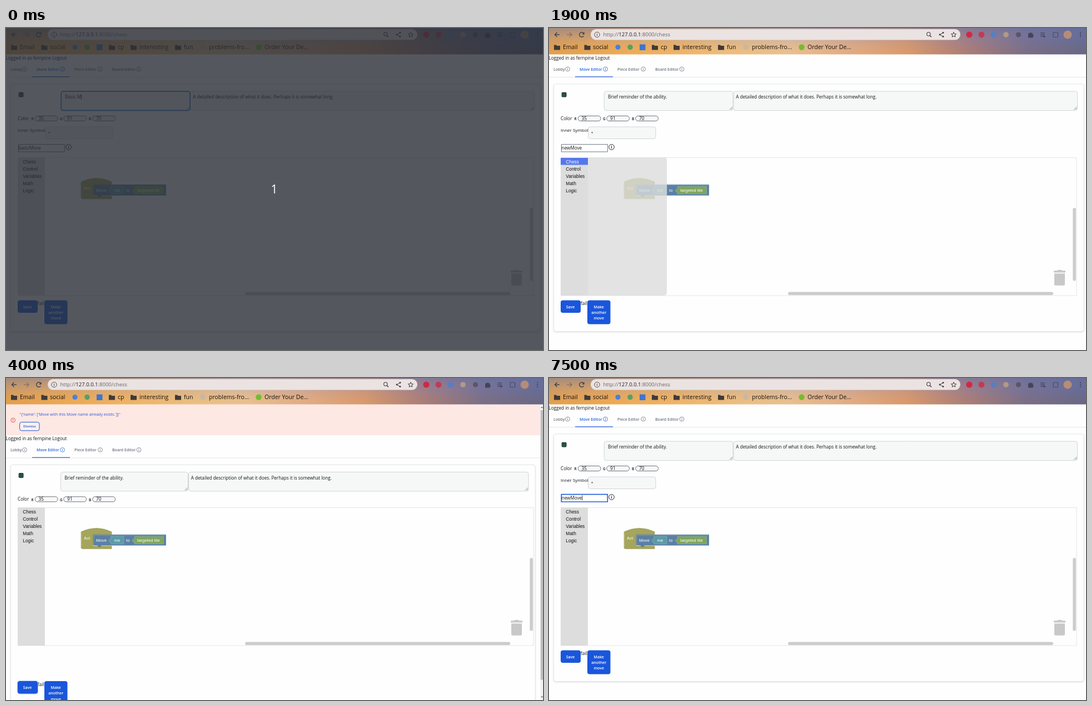
Animation, 966 px wide and 580 px high, one loop 8000 ms. Source, as an HTML page with a canvas:

```html
<!DOCTYPE html>
<html lang="en">
<head>
<meta charset="utf-8">
<title>Move editor</title>
<style>
html, body { margin: 0; width: 100%; height: 100%; overflow: hidden; background: #fefefe; }
canvas { display: block; width: 966px; height: 580px; }
</style>
</head>
<body>
<canvas id="stage" width="966" height="580"></canvas>
<script>
const ctx = document.getElementById('stage').getContext('2d');
const LOOP = 8000;
const UI = '"Open Sans", "Noto Sans", sans-serif';
const ARIAL = '"Liberation Sans", Arial, sans-serif';
const INK = '#141414', BLUE = '#1a56db', DARK_BLUE = '#1e429f', RING = '#a4cafe', LINE = '#d1d5d8';
let t = 0;

const during = (from, to) => t >= from && t < to;

// y is the middle of the capital letters
function text(s, x, y, size = 8.15, color = INK, { weight = 400, font = UI, align = 'left' } = {}) {
  ctx.font = `${weight} ${size}px ${font}`;
  ctx.textAlign = align;
  ctx.fillStyle = color;
  ctx.fillText(s, x, y + size * 0.36);
  return ctx.measureText(s).width;
}

function box(x, y, x2, y2, r, fill, stroke, width = 1) {
  ctx.beginPath();
  ctx.roundRect(x, y, x2 - x, y2 - y, r);
  paint(fill, stroke, width);
}

function paint(fill, stroke, width = 1) {
  if (fill) { ctx.fillStyle = fill; ctx.fill(); }
  if (stroke) { ctx.strokeStyle = stroke; ctx.lineWidth = width; ctx.stroke(); }
}

function disc(x, y, r, fill, stroke, width = 1) {
  ctx.beginPath();
  ctx.arc(x, y, r, 0, Math.PI * 2);
  paint(fill, stroke, width);
}

function line(color, width, ...points) {
  ctx.beginPath();
  for (let i = 0; i < points.length; i += 2) ctx.lineTo(points[i], points[i + 1]);
  paint(null, color, width);
}

function shape(d, fill, stroke, width = 1) {
  const path = new Path2D(d);
  if (fill) { ctx.fillStyle = fill; ctx.fill(path); }
  if (stroke) { ctx.strokeStyle = stroke; ctx.lineWidth = width; ctx.stroke(path); }
}

function gradient(x, y, x2, y2, stops) {
  const g = ctx.createLinearGradient(x, y, x2, y2);
  stops.forEach((c, i) => g.addColorStop(i / (stops.length - 1), c));
  return g;
}

function info(x, y, r, color) {
  disc(x, y, r, null, color, r / 5);
  ctx.fillStyle = color;
  const w = r / 4.5;
  ctx.fillRect(x - w / 2, y - r * 0.15, w, r * 0.65);
  ctx.fillRect(x - w / 2, y - r * 0.5, w, w);
}

function folder(x) {
  shape(`M${x} 30.5h4l1.2 1.5h5.8v7.5h-11z`, '#3f3a3a');
}

function sky() {
  ctx.fillStyle = gradient(0, 0, 966, 0, ['#e3a04c', '#efab55', '#f2b666', '#efc384', '#ecc69a', '#e3b08c', '#d99a70', '#a2797f', '#6a6890', '#56608f']);
  ctx.fillRect(0, 0, 966, 47.5);
  ctx.fillStyle = gradient(0, 0, 0, 47, ['rgba(110,120,165,.55)', 'rgba(150,140,165,.25)', 'rgba(230,150,60,.12)']);
  ctx.fillRect(0, 0, 966, 47.5);
}

function toolbar() {
  const ink = '#3b3b42';
  line(ink, 1.3, 14.5, 8, 10.5, 12, 14.5, 16);
  line(ink, 1.3, 10.5, 12, 19, 12);
  line('rgba(70,65,75,.45)', 1.3, 37, 8, 41, 12, 37, 16);
  line('rgba(70,65,75,.45)', 1.3, 32, 12, 41, 12);
  ctx.beginPath();
  ctx.arc(59, 12, 4.2, 0.6, 5.5);
  paint(null, ink, 1.4);
  shape('M63.6 7.2v4.2h-4.2z', ink);

  box(75, 2, 740, 21.5, 10, '#ebe3e2');
  info(86.5, 12, 4.7, '#4a4a50');
  let x = 97.5;
  x += text('http://', x, 12, 9.5, '#66646a');
  x += text('127.0.0.1', x, 12, 9.5, '#1e1e22');
  text(':8000/chess', x, 12, 9.5, '#66646a');

  disc(682.8, 11, 3.2, null, ink, 1.1);
  line(ink, 1.3, 685, 13.5, 688, 16.3);
  line(ink, 1, 709, 8.5, 703, 12, 709, 15.5);
  for (const [a, b] of [[709, 8.5], [703, 12], [709, 15.5]]) disc(a, b, 1.4, ink);
  ctx.beginPath();
  for (let i = 0; i < 10; i++) {
    const a = -Math.PI / 2 + i * Math.PI / 5, r = i % 2 ? 2.1 : 4.8;
    ctx.lineTo(728 + r * Math.cos(a), 12.3 + r * Math.sin(a));
  }
  ctx.closePath();
  paint(null, ink, 1);

  disc(756, 12, 5.6, '#cf2945');
  disc(778, 12, 5.4, '#c23a54');
  disc(800, 12, 5.3, '#587fc0');
  disc(822, 12, 4.8, '#b19a86');
  disc(844.5, 12, 4.6, '#5b5568');
  shape('M862 9.5h3a1.6 1.6 0 1 1 3.2 0h2.300v3a1.500 1.500 0 1 1 0 3v2h-8.500z', '#46435a');
  for (const y of [9, 12, 15]) line('#45435c', 1.2, 884, y, y > 14 ? 889 : 892, y);
  shape('M889.5 13l4.500 2.300-4.500 2.300z', '#45435c');
  box(907, 8, 915.5, 16.5, 1, null, '#4c4a63', 1.2);
  disc(933, 12, 7.5, '#b48d78');
  for (const y of [8.5, 12, 15.5]) disc(956, y, 1, '#3a3d5c');
}

function bookmarks() {
  [9, 63.5, 185, 224, 304].forEach(folder);
  disc(124, 34.5, 4.6, '#4a80dc');
  disc(146, 34.5, 4.8, '#57a066');
  box(163, 29.5, 173.5, 40, 0, '#3d75d0');
  disc(354, 34.5, 5, '#c8b7a4');
  disc(454.5, 34.5, 5.2, '#72bd2f');
  const labels = [['Email', 25], ['social', 79], ['cp', 201], ['interesting', 240], ['fun', 320], ['problems-fro…', 365], ['Order Your De…', 465]];
  for (const [s, x] of labels) text(s, x, 34.5, 10.5, '#17130f');
}

function tabs() {
  text('Logged in as fernpine Logout', -0.5, 54);
  ctx.fillStyle = '#e4e6e9';
  ctx.fillRect(0, 88, 966, 1);
  const hover = during(5800, 5900);
  const tab = (s, x, icon, color) => {
    text(s, x, 74, 7, color, { weight: 600 });
    info(icon, 74, 3.9, color);
  };
  const grey = '#6b7280';
  tab('Lobby', 8, 33.5, grey);
  tab('Move Editor', 55, 101.5, '#2563d9');
  tab('Piece Editor', 123, 169.5, hover ? '#3f4754' : grey);
  tab('Board Editor', 191, 239, grey);
  if (hover) { ctx.fillStyle = LINE; ctx.fillRect(115, 87, 68, 1.3); }
  ctx.fillStyle = '#2f68dc';
  ctx.fillRect(47, 87.2, 68, 1.3);
}

function field(x, x2, s, pad, focused, caret) {
  box(x + 0.5, 114, x2 - 0.5, 148.5, 4, '#f6f8f7', focused ? '#3b7ae0' : LINE, focused ? 1.6 : 1);
  const w = text(s, x + pad, 124.5);
  if (caret) line('#111', 0.8, x + pad + w + 0.6, 120, x + pad + w + 0.6, 129);
  line('#666', 0.7, x2 - 6.5, 147, x2 - 1.5, 142);
  line('#666', 0.7, x2 - 3.8, 147, x2 - 1.5, 144.7);
}

function number(label, x, value) {
  text(label, x - 6.5, 163.8, 6.4, INK, { weight: 600 });
  box(x + 0.3, 158.4, x + 41, 167.5, 4.2, '#f7f8f8', '#5d636b', 0.9);
  text(value, x + 6.5, 163, 8.3);
}

function moveName() {
  if (t < 200) return 'Basic M';
  if (t < 300) return 'Basic Mov';
  return t < 1800 ? 'Basic Move' : 'Brief reminder of the ability.';
}

function form(error) {
  const right = error ? 952 : 962;
  ctx.save();
  ctx.shadowColor = 'rgba(0,0,0,.16)';
  ctx.shadowBlur = 3;
  ctx.shadowOffsetY = 1;
  box(8.5, 101, right, 546.5, 4, '#fefefe');
  ctx.restore();
  box(8.5, 101, right, 546.5, 4, null, '#e3e5e8', 0.9);

  box(23.2, 116.2, 31, 124, 1, '#235b46', '#1d2723', 1);
  text('+', 25, 119.5, 4.5, '#07130e');

  const split = error ? 328 : 331.5;
  const describe = during(600, 1700);
  field(error ? 98 : 98.7, split, moveName(), 7.3, t < 600, t < 600);
  field(split, error ? 940.5 : 951, 'A detailed description of what it does. Perhaps it is somewhat long.', 4.7, describe, during(600, 1200));
  if (t < 600) box(99.2, 114, 331, 148.5, 4, null, '#3b7ae0', 1.6);

  text('Color', 21, 163);
  number('R', 52, '35');
  number('G', 103.5, '91');
  number('B', 155.5, '70');
  if (during(5600, 5700)) {
    shape('M184 162l2.200-2.600 2.200 2.600zM184 164l2.200 2.600 2.200-2.600z', '#333');
  }

  text('Inner Symbol', 21, 183.7, 8);
  box(70.5, 178, 192, 199.5, 4, '#f6f8f7', LINE);
  text('+', 75.8, 188.5, 7);

  const editing = t >= 7500;
  box(22.3, 209.7, 105.3, 223, 0, '#fff', editing ? '#2563d9' : '#5f6670', editing ? 1.7 : 0.9);
  const w = text(t < 1800 ? 'basicMove' : 'newMove', 22.7, 216);
  if (editing) line('#111', 0.8, 23.4 + w, 211.5, 23.4 + w, 220.5);
  info(112.5, 214.5, 4.8, '#171717');
}

function buttons(error) {
  const saving = during(3800, 4000);
  const x = saving ? 87 : 69;
  const white = { weight: 600, align: 'center' };
  text(saving ? 'saving...' : 'fail', 57, 496.5, 8.15);
  if (during(3800, 6300)) box(20, 489.5, 58, 514, 5, RING);
  box(21, 490.5, 57, 513, 4, during(3200, 4000) ? DARK_BLUE : BLUE);
  text('Save', 38.5, 502, 7, '#fff', white);
  box(x, 490.5, x + 41.5, 533.5, 4, BLUE);
  ['Make', 'another', 'move'].forEach((s, i) => text(s, x + 20.7, 502 + i * 10.4, 7, '#fff', white));
}

function blocks() {
  const olive = '#a5a55b', blue = '#5b80a5', teal = '#5b9ba5', green = '#80a55b';
  const label = (s, x, y) => text(s, x, y, 7.8, '#fff', { font: ARIAL });
  shape('M135 277Q162.500 264 190 277V282H157V302.700H190V307.700H138Q135 307.700 135 304.700Z', olive, '#92924f', 0.6);
  line('#c4c48f', 0.7, 135.6, 304, 135.6, 277.3);
  shape('M157 282.300H287.500V301.300H172l-2.300 2.700h-3l-2.300-2.700H159.500Q157 301.300 157 299Z', blue, '#4b6f94', 0.6);
  line('#8ca6c0', 0.7, 157.7, 299, 157.7, 283, 287, 283);
  const value = (x, x2, color) => {
    shape(`M${x} 285.300H${x2}V299H${x}V295.500C${x - 4.5} 297 ${x - 4.5} 288.500 ${x} 290.500Z`, color, '#8fb3b5', 0.6);
  };
  value(188.5, 212, teal);
  value(231, 283.5, green);
  label('Act', 140, 288.3);
  label('Move', 162, 292);
  label('me', 194.5, 292.3);
  label('to', 216, 292);
  label('targeted tile', 236, 292.3);
}

function workspace() {
  box(21.5, 233.5, 949, 482, 0, '#fefefe', '#e2e2e2', 0.9);
  blocks();
  box(430, 475.5, 907, 481, 2.8, '#ccc');
  box(942.3, 324, 947.8, 455.5, 2.8, '#ccc');
  shape('M908 440.500v-2.500q0-1 1-1h5.500v-1.200h8v1.200h5.500q1 0 1 1v2.500zM909 442.300h19v19.500q0 2-2 2h-15q-2 0-2-2z', '#c8c8c8');

  const open = during(1700, 2600);
  if (open) box(70, 233, 212, 482, [0, 5, 5, 0], 'rgba(221,221,221,.8)');
  ctx.fillStyle = '#ddd';
  ctx.fillRect(21, 233, 49, 249);
  if (open || during(1600, 1700)) {
    ctx.fillStyle = open ? '#5577ee' : '#e6e6e6';
    ctx.fillRect(21, 234, 49, 12.5);
  }
  ['Chess', 'Control', 'Variables', 'Math', 'Logic'].forEach((s, i) =>
    text(s, 30.3, 240.6 + i * 13.05, 8.3, open && !i ? '#fff' : '#111', { font: ARIAL }));
}

function banner() {
  ctx.fillStyle = '#fde8e4';
  ctx.fillRect(0, 47.5, 961, 55.7);
  text('"{\'name\': [\'Move with this Move name already exists.\']}"', 24.3, 65.3, 7.1, '#2f58dc');
  disc(12.7, 76, 3.8, null, '#dc4a3e', 0.9);
  line('#dc4a3e', 0.9, 12.7, 73.8, 12.7, 76.6);
  line('#dc4a3e', 0.9, 12.7, 77.4, 12.7, 78.3);
  const hover = t >= 6100;
  if (t >= 6300) box(21, 77.5, 63, 97.5, 5, RING);
  box(24.6, 79.6, 60, 94.8, 3.5, hover ? DARK_BLUE : '#fdf0ed', BLUE, 1);
  text('Dismiss', 42.3, 87.3, 6.1, hover ? '#fff' : BLUE, { weight: 600, align: 'center' });
}

function scrollbar() {
  ctx.fillStyle = '#f3f3f3';
  ctx.fillRect(961, 47.5, 5, 533);
  ctx.fillStyle = '#bdbdbd';
  ctx.fillRect(961.7, 58, 4.3, 485.5);
  shape('M962 54l2-2.500 2 2.500zM962 573.500l2 2.500 2-2.500z', '#666');
}

function draw() {
  const error = during(4000, 6500);
  ctx.fillStyle = '#fefefe';
  ctx.fillRect(0, 0, 966, 580);

  ctx.save();
  if (error) ctx.translate(0, 55.4);
  tabs();
  form(error);
  buttons(error);
  ctx.restore();

  workspace();
  if (error) { banner(); scrollbar(); }
  sky();
  toolbar();
  bookmarks();

  if (t < 100) {
    ctx.fillStyle = 'rgba(42,47,54,.8)';
    ctx.fillRect(0, 0, 966, 580);
    text('1', 482.5, 290.5, 21, '#fff', { align: 'center' });
  }
}

const start = performance.now();
function tick() {
  t = (performance.now() - start) % LOOP;
  draw();
  requestAnimationFrame(tick);
}
tick();
</script>
</body>
</html>
```
